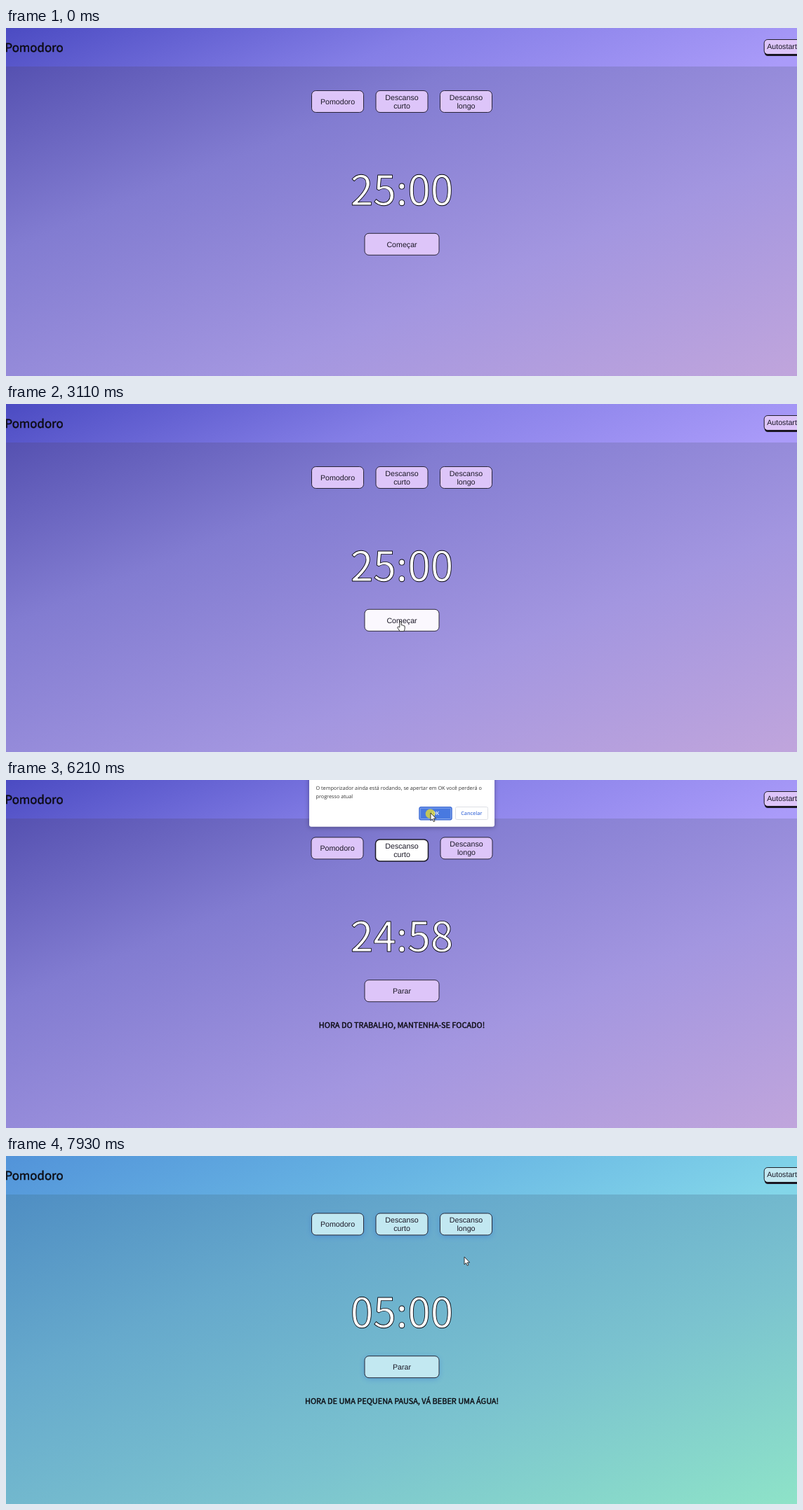
These frames come from a looping animation (1127 px wide and 497 px high, 8000 ms). An HTML page with a canvas:

```html
<!DOCTYPE html>
<html lang="pt">
<head>
<meta charset="utf-8">
<title>Pomodoro</title>
<style>
html, body { margin: 0; width: 100%; height: 100%; overflow: hidden; }
canvas { display: block; }
</style>
</head>
<body>
<canvas id="stage" width="1127" height="497"></canvas>
<script>
const W = 1127, H = 497, LOOP = 8000, FADE = 250, CLICK = 70;
const ctx = document.getElementById('stage').getContext('2d');
if ('textRendering' in ctx) ctx.textRendering = 'geometricPrecision';

const ARIAL = '10.67px "Liberation Sans", Arial, sans-serif';
const SOURCE = '"Noto Sans CJK JP", "Noto Sans CJK SC", "Noto Sans CJK", "Noto Sans", sans-serif';
const UI = '"Open Sans", "Noto Sans", sans-serif';
const INK = '#1b1826';

const PURPLE = {
  head: ['#4b4bc2', '#847ee6', '#aa9bf9'],
  body: ['#4c48aa', '#827cd1', '#a396e0', '#c0a5dc'],
  button: [221, 197, 249], glow: 'transparent'
};
const BLUE = {
  head: ['#5293d9', '#67b4e3', '#83d6e9'],
  body: ['#4a88c1', '#66a9cc', '#7bc3cf', '#8ee3c8'],
  button: [194, 232, 241], glow: 'rgba(50,110,215,.4)'
};

// Each pointer move: start, end, target x and y, sideways bend
const HOME = [1112, 288];
const MOVES = [
  { from: 390, to: 1000, x: 1096, y: 30, bend: -45 },
  { from: 1980, to: 2640, x: 566, y: 106, bend: 0 },
  { from: 2710, to: 2950, x: 562, y: 311, bend: 0 },
  { from: 3720, to: 4200, x: 592, y: 107, bend: 0 },
  { from: 4490, to: 4690, x: 580, y: 89, bend: 0 },
  { from: 5480, to: 6000, x: 605, y: 47, bend: 0 },
  { from: 6350, to: 6850, x: 565, y: 304, bend: 0 },
  { from: 7270, to: 7930, x: 653, y: 144, bend: 6 }
];

// Clicks in order: autostart on, autostart off, start, short break, OK, start
const CLICKS = [1250, 1910, 3290, 5150, 6210, 6910];
const [autoOn, autoOff, started, asked, confirmed, restarted] = CLICKS.map(c => c + CLICK);
const FIRST_TICK = started + 1000, SECOND_TICK = FIRST_TICK + 1060;
const DIALOG_END = confirmed + 70;

const AREAS = {
  auto: [1080, 14, 60, 28],
  pomodoro: [435, 82, 75, 39],
  short: [527, 82, 75, 39],
  long: [618, 82, 75, 39],
  main: [511, 286, 106, 38]
};

const clamp = v => Math.max(0, Math.min(1, v));
const ease = k => k * k * (3 - 2 * k);
const mix = (a, b, k) => a.map((v, i) => v + (b[i] - v) * k);
const css = c => `rgb(${c.map(Math.round)})`;
const clicking = t => CLICKS.some(c => t >= c && t < c + CLICK);
const dialogOpen = t => t >= SECOND_TICK && t < DIALOG_END;

function pointerAt(t) {
  let [x, y] = HOME;
  for (const m of MOVES) {
    if (t < m.from) break;
    const k = ease(clamp((t - m.from) / (m.to - m.from)));
    x += (m.x - x) * k + m.bend * Math.sin(Math.PI * k);
    y += (m.y - y) * k;
  }
  return [x, y];
}

// The page sees no pointer movement while the dialog is open
function over(name, t) {
  if (t < MOVES[0].from) return false;
  const [px, py] = pointerAt(dialogOpen(t) ? SECOND_TICK : t);
  const [x, y, w, h] = AREAS[name];
  return px >= x && px < x + w && py >= y && py < y + h;
}

// Hover strength: share of the last FADE ms spent over the button
function hover(name, t) {
  const steps = 25;
  let hits = 0;
  for (let i = 0; i < steps; i++) hits += over(name, t - FADE * i / steps);
  return hits / steps;
}

function text(str, x, y, font, color = INK, align = 'center') {
  ctx.font = font;
  ctx.fillStyle = color;
  ctx.textAlign = align;
  ctx.fillText(str, x, y);
}

function outlined(str, x, y, size, fill, line, align = 'center') {
  text(str, x, y, `${size}px ${SOURCE}`, fill, align);
  ctx.lineJoin = 'round';
  ctx.lineWidth = line;
  ctx.strokeStyle = '#0b0a10';
  ctx.strokeText(str, x, y);
}

function box(x, y, w, h, r, fill, stroke, line = .9) {
  ctx.beginPath();
  ctx.roundRect(x, y, w, h, r);
  ctx.fillStyle = fill;
  ctx.fill();
  if (!stroke) return;
  ctx.shadowColor = 'transparent';
  ctx.lineWidth = line;
  ctx.strokeStyle = stroke;
  ctx.stroke();
}

function raisedBox(color, blur, dy, ...shape) {
  ctx.save();
  ctx.shadowColor = color;
  ctx.shadowBlur = blur;
  ctx.shadowOffsetY = dy;
  box(...shape);
  ctx.restore();
}

function slope(colors, span) {
  const angle = 158 * Math.PI / 180, sx = Math.sin(angle), sy = -Math.cos(angle);
  const half = (W * sx + H * sy) / 2, dx = sx * half, dy = sy * half;
  const g = ctx.createLinearGradient(W / 2 - dx, H / 2 - dy, W / 2 + dx, H / 2 + dy);
  colors.forEach((c, i) => g.addColorStop(span * i / (colors.length - 1), c));
  return g;
}

function backdrop(theme) {
  ctx.fillStyle = slope(theme.body, 1);
  ctx.fillRect(0, 0, W, H);
  ctx.fillStyle = slope(theme.head, .52);
  ctx.fillRect(0, 0, W, 55);
  outlined('Pomodoro', 81.6, 33.8, 16.8, '#0b0a10', .4, 'right');
}

function button(lines, cx, y, w, fill, glow, line) {
  raisedBox(glow, 8, 2, cx - w / 2, y, w, 31, 6, css(fill), INK, line);
  const first = y + 19.3 - (lines.length - 1) * 6.2;
  lines.forEach((s, i) => text(s, cx, first + i * 12.4, ARIAL));
}

function autoButton(t, fill) {
  const on = t >= autoOn && t < autoOff;
  const down = t >= CLICKS[0] && t < autoOff;
  const x = on ? 1032.5 : 1080.2, y = down ? 22 : 16.5;
  if (!down) box(x + .5, y + 2.6, 90, 21, 5, '#1b1724');
  box(x, y, 120, down ? 20 : 21, 5, css(fill), '#0f0d14', on ? 1.6 : .9);
  text(on ? 'Desativar autostart' : 'Autostart', x + 4, y + (down ? 12.8 : 13.8), ARIAL, INK, 'left');
}

function dialog(closing) {
  const dy = closing ? -1.2 : 0;
  raisedBox('rgba(0,0,0,.35)', 6, 1, 432, -10, 264, 76.7 + dy, 3, '#fff');
  const say = (s, y) => text(s, 441.5, y + dy, `7.26px ${UI}`, '#333', 'left');
  say('O temporizador ainda está rodando, se apertar em OK você perderá o', 14.3);
  say('progresso atual', 26);
  box(588.8, 38.5 + dy, 46.4, 18.5, 2, '#4375e2', '#3564cf');
  if (!closing) box(590.2, 40, 43.6, 15.5, 1, '#4879e0', '#a9c2f3', .7);
  box(640.5, 38.5 + dy, 46, 18, 2, '#fff', '#dadce3');
  text('OK', 612, 50.4 + dy, `600 7.2px ${UI}`, '#fff');
  text('Cancelar', 663.3, 50.4 + dy, `600 7.2px ${UI}`, '#4a76dc');
}

const ARROW = new Path2D('M0 0V11L2.5 8.7L4.2 12.5L6 11.7L4.3 8H7.7Z');
const HAND = new Path2D('M-1.2 8V.8Q-1.2-.6 0-.6T1.2.8V4.8Q2.4 4.1 3 5.2Q4.2 4.6 4.7 5.8' +
  'Q6.2 5.4 6.2 7V9.5Q6.1 11.6 4.8 13.6H-.8Q-2.5 11-4.2 8.6Q-4.2 6.6-2.6 7.3Z');

function pointer(t) {
  if (t < MOVES[0].from) return;
  const [x, y] = pointerAt(t);
  if (clicking(t)) {
    ctx.beginPath();
    ctx.arc(x - .5, y + 1.3, 6.8, 0, Math.PI * 2);
    ctx.fillStyle = 'rgba(232,223,45,.75)';
    ctx.fill();
  }
  const hand = !dialogOpen(t) && Object.keys(AREAS).some(name => over(name, t));
  const shape = hand ? HAND : ARROW;
  ctx.save();
  ctx.translate(x, y);
  ctx.lineJoin = 'round';
  ctx.lineWidth = .9;
  ctx.fillStyle = '#fff';
  ctx.strokeStyle = '#222';
  ctx.fill(shape);
  ctx.stroke(shape);
  ctx.restore();
}

function draw(t) {
  const onBreak = t >= confirmed;
  const theme = onBreak ? BLUE : PURPLE;
  const running = t >= (onBreak ? restarted : started);
  const base = mix(PURPLE.button, BLUE.button, onBreak ? clamp((t - confirmed + 45) / 350) : 0);
  const up = running ? -7.6 : 0;
  const tint = name => mix(base, [255, 255, 255], hover(name, t));

  backdrop(theme);
  autoButton(t, tint('auto'));

  const grow = hover('short', t);
  const pressed = t >= CLICKS[3] && !onBreak;
  const sink = 3 * clamp((t - CLICKS[3]) / 130) * clamp(1 - (t - confirmed + 60) / 200);
  const row = 89.5 + up;
  button(['Pomodoro'], 472.5 - grow / 2, row, 74, tint('pomodoro'), theme.glow);
  button(['Descanso', 'curto'], 564, row + sink, 74 + grow, tint('short'), theme.glow, pressed ? 1.5 : .9);
  button(['Descanso', 'longo'], 655.5 + grow / 2, row, 74, tint('long'), theme.glow);

  const time = onBreak ? '05:00' : t >= SECOND_TICK ? '24:58' : t >= FIRST_TICK ? '24:59' : '25:00';
  outlined(time, 564, 252.7 + up, 58.6, '#fff', .9);

  const mainSink = clicking(t) && over('main', t) ? 2 : 0;
  button([running ? 'Parar' : 'Começar'], 564, 293.3 + up + mainSink, 106, tint('main'), theme.glow);
  if (running) {
    const note = onBreak ? 'HORA DE UMA PEQUENA PAUSA, VÁ BEBER UMA ÁGUA!'
      : 'HORA DO TRABALHO, MANTENHA-SE FOCADO!';
    outlined(note, 564, 353.9, 10.95, '#0b0a10', .4);
  }

  if (dialogOpen(t)) dialog(onBreak);
  pointer(t);
}

const origin = performance.now();
function frame() {
  draw((performance.now() - origin) % LOOP);
  requestAnimationFrame(frame);
}
frame();
</script>
</body>
</html>
```
